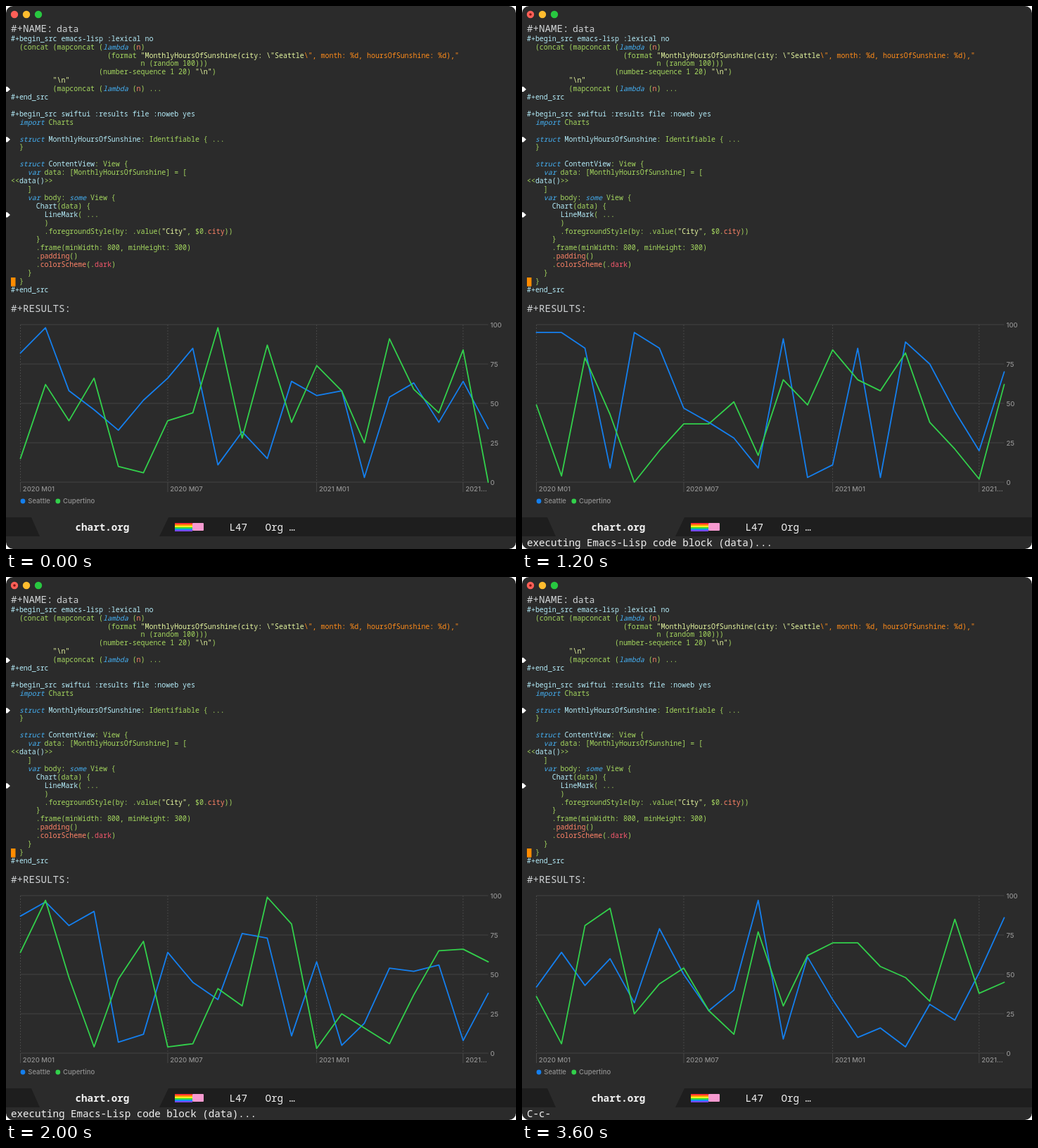
An HTML page that plays this animation: 725 by 772 pixels, repeating every 3800 ms.

```html
<!DOCTYPE html>
<html lang="en">
<head>
<meta charset="utf-8">
<title>Org chart</title>
<style>
  html, body { margin: 0; width: 100%; height: 100%; overflow: hidden; background: #fff; }
  #window { position: relative; width: 725px; height: 772px; border-radius: 10px; overflow: hidden; background: #2b2b2b; }
  svg { position: absolute; left: 0; top: 0; }
  pre, svg { font-family: "Noto Sans Mono", "DejaVu Sans Mono", monospace; }
  pre { position: absolute; left: 7px; top: 40.7px; margin: 0; font-size: 9.933px; line-height: 11.9px; font-weight: 500; color: #a5d75f; }
  pre * { font-weight: 500; text-decoration: none; }
  pre i { color: #45b1f5; }
  pre b { color: #b5edfa; }
  pre q { color: #e6f7a0; quotes: none; }
  pre u { color: #ff8c1a; }
  pre em { color: #ff8468; font-style: normal; }
  pre s { color: #f4586c; }
  .ui { font-size: 14.2px; font-weight: 500; fill: #f2f2f2; white-space: pre; }
  .head { fill: #cfd2d4; font-weight: 400; }
  #chart text { font: 500 9.5px Inter, sans-serif; fill: #929292; }
  .line { fill: none; stroke-width: 1.8; stroke-linejoin: round; stroke-linecap: round; }
</style>
</head>
<body>
<div id="window">
<pre><b>#+begin_src emacs-lisp :lexical no</b>
  (concat (mapconcat (<i>lambda</i> (<em>n</em>)
                       (format <q>"MonthlyHoursOfSunshine(city: \"Seattle</q><u>\", month: %d, hoursOfSunshine: %d),"</u>
                               n (random 100)))
                     (number-sequence 1 20) <q>"\n"</q>)
          <q>"\n"</q>
          (mapconcat (<i>lambda</i> (<em>n</em>) ...
<b>#+end_src</b>

<b>#+begin_src swiftui :results file :noweb yes</b>
  <i>import</i> Charts

  <i>struct</i> <b>MonthlyHoursOfSunshine</b>: Identifiable { ...
  }

  <i>struct</i> <b>ContentView</b>: View {
    <i>var</i> data: [MonthlyHoursOfSunshine] = [
&lt;&lt;<b>data()</b>&gt;&gt;
    ]
    <i>var</i> body: <i>some</i> View {
      <b>Chart</b>(data) {
        <b>LineMark</b>( ...
        )
        .foregroundStyle(by: .value(<q>"City"</q>, $0.<em>city</em>))
      }
      .frame(minWidth: 800, minHeight: 300)
      .<em>padding</em>()
      .<em>colorScheme</em>(.<s>dark</s>)
    }
  }
<b>#+end_src</b></pre>
<svg width="725" height="772" viewBox="0 0 725 772">
  <circle cx="12" cy="12" r="5.2" fill="#ff5f57"/>
  <circle id="edited" cx="12" cy="12" r="1.8" fill="#7d1410"/>
  <circle cx="29" cy="12" r="5.2" fill="#febc2e"/>
  <circle cx="46" cy="12" r="5.2" fill="#28c840"/>
  <text class="ui head" x="6.9" y="37">#+NAME:</text>
  <text class="ui head" x="72" y="37" style="font-size:13.1px">data</text>
  <text class="ui head" x="6.9" y="435">#+RESULTS:</text>
  <path d="M0 114.8h2l4 3.6-4 3.6h-2zm0 71.4h2l4 3.6-4 3.6h-2zm0 107.1h2l4 3.6-4 3.6h-2z" fill="#fff"/>
  <rect id="cursor" x="7" y="386" width="6.5" height="12.6" fill="#ff8c00"/>

  <g id="chart"></g>

  <path d="M0 727H36L48 754H0zM231 727H725V754H218z" fill="#1e1e1e"/>
  <g id="rainbow"></g>
  <rect x="265" y="735" width="16" height="11" rx="1" fill="#f79ad0"/>
  <text class="ui" x="98.6" y="745.7" style="font-weight:700">chart.org</text>
  <text class="ui" x="317.5" y="745.7">L47</text>
  <text class="ui" x="368.5" y="745.7">Org …</text>
  <text id="message" class="ui" x="6.9" y="767.6"></text>
</svg>
</div>
<script>
const $ = id => document.getElementById(id);
const LOOP = 3800, BLUE = "#147fee", GREEN = "#32d04b";
const LEFT = 20.5, BOTTOM = 677, RIGHT = 685.5;

function add(parent, tag, attrs, text = "") {
  const node = document.createElementNS("http://www.w3.org/2000/svg", tag);
  for (const key in attrs) node.setAttribute(key, attrs[key]);
  node.textContent = text;
  return parent.appendChild(node);
}

// Month number (0 = January 2020) to x, spaced by real days
const LAST = 19;
const days = month => (Date.UTC(2020, month) - Date.UTC(2020, 0)) / 864e5;
const xOf = month => LEFT + days(month) * (RIGHT - LEFT) / days(LAST);
const yOf = value => BOTTOM - value * 2.24;

function drawAxes() {
  const chart = $("chart");
  for (let v = 0; v <= 100; v += 25) {
    add(chart, "path", { d: `M${LEFT} ${yOf(v)}H${RIGHT}`, stroke: "#434343" });
    add(chart, "text", { x: 688.5, y: yOf(v) + 3.5 }, v);
  }
  ["2020 M01", "2020 M07", "2021 M01", "2021…"].forEach((label, i) => {
    const x = xOf(i * 6);
    add(chart, "path", { d: `M${x} 453V${BOTTOM}`, stroke: "#484848", "stroke-dasharray": "2 2" });
    add(chart, "path", { d: `M${x} ${BOTTOM}V691`, stroke: "#484848" });
    add(chart, "text", { x: x + 3.3, y: 690.2 }, label);
  });
  [["Seattle", 24, BLUE], ["Cupertino", 73.8, GREEN]].forEach(([city, x, fill]) => {
    add(chart, "circle", { cx: x, cy: 704, r: 3.4, fill });
    add(chart, "text", { x: x + 7.3, y: 707.4 }, city);
  });
}

const plots = [];
function plot(start, seattle, cupertino) {
  const group = add($("chart"), "g", {});
  const line = (values, stroke) => add(group, "polyline", {
    class: "line", stroke, points: values.map((v, i) => `${xOf(i)},${yOf(v)}`).join(" ")
  });
  line(seattle, BLUE);
  line(cupertino, GREEN);
  plots.push([start, group]);
}

drawAxes();
plot(0,
  [82, 98, 58, 46, 33, 52, 66, 85, 11, 32, 15, 64, 55, 58, 3, 54, 63, 38, 64, 34],
  [15, 62, 39, 66, 10, 6, 39, 44, 98, 28, 87, 38, 74, 58, 25, 91, 59, 44, 84, 0]);
plot(800,
  [95, 95, 85, 9, 95, 85, 47, 38, 28, 9, 91, 3, 11, 85, 3, 89, 75, 45, 20, 70],
  [49, 4, 79, 43, 0, 20, 37, 37, 51, 17, 65, 49, 84, 65, 58, 82, 38, 21, 2, 62]);
plot(1600,
  [87, 96, 81, 90, 7, 12, 64, 45, 34, 76, 73, 11, 58, 5, 19, 54, 52, 56, 8, 38],
  [64, 97, 48, 4, 47, 71, 4, 6, 41, 30, 99, 82, 3, 25, 16, 6, 37, 65, 66, 58]);
plot(2600,
  [42, 64, 43, 60, 32, 79, 50, 27, 40, 97, 9, 61, 34, 10, 16, 4, 31, 21, 51, 86],
  [36, 6, 81, 92, 25, 44, 54, 27, 12, 77, 30, 62, 70, 70, 55, 48, 33, 85, 38, 45]);

["#f33", "#f90", "#fe2", "#3d3", "#19f", "#74e"].forEach((fill, i) =>
  add($("rainbow"), "rect", { x: 240, y: 735 + i * 2, width: 25, height: 2, fill }));

const BUSY = "executing Emacs-Lisp code block (data)...";
const DONE = "No buffer filename in swift mode.";
const messages = [
  [0, ""], [300, BUSY], [800, DONE], [1100, ""], [1200, BUSY], [1600, DONE],
  [1900, ""], [2000, BUSY], [2600, DONE], [3500, ""], [3600, "C-c-"]
];

const current = (steps, t) => steps.findLast(([start]) => start <= t)[1];
const show = (node, on) => node.setAttribute("visibility", on ? "visible" : "hidden");

function render() {
  const t = performance.now() % LOOP;
  const active = current(plots, t);
  for (const [, group] of plots) show(group, group === active);
  $("message").textContent = current(messages, t);
  show($("edited"), t >= 800);
  show($("cursor"), t < 3100 || t >= 3500);
  requestAnimationFrame(render);
}
render();
</script>
</body>
</html>
```
